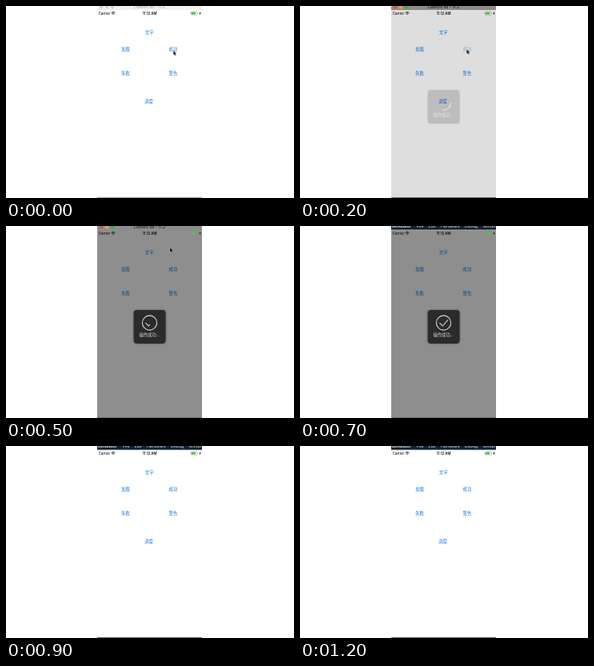
Write an HTML page that moves like this. It is 360x240 px and loops after 1.3 s.

```html
<!DOCTYPE html>
<html lang="zh">
<head>
<meta charset="utf-8">
<title>操作成功</title>
<style>
html, body { margin: 0; width: 100%; height: 100%; overflow: hidden; background: #fff; }
svg { display: block; width: 360px; height: 240px; }
text { font-family: Inter, "Noto Sans CJK SC", "Noto Sans CJK", sans-serif; }
.mid { text-anchor: middle; }
.links { font-size: 5.4px; font-weight: 500; fill: #087be8; }
.status { font-size: 4.3px; fill: #111; }
.title { font-size: 5px; text-anchor: middle; }
.line { fill: none; stroke: #f4f4f4; stroke-width: 1.1; }

/* One loop has 13 steps of 100 ms: each step is 7.69 %. */
.a { animation: 1300ms step-end infinite; }
.idle { animation-name: idle; }
.active { animation-name: active; }
.menu { animation-name: menu; }
.press { animation-name: press; }
.dim { animation-name: dim; }
.box { animation-name: box; filter: drop-shadow(0 0 1.5px rgba(0, 0, 0, .35)); }
.content { animation-name: content; }
.ring { stroke-dasharray: 360 360; transform-origin: 179.5px 121px; animation-name: ring; }
.check { stroke-dasharray: 100 110; animation-name: check; }
.cursor { animation-name: cursor; }

@keyframes idle { 0% { opacity: 1 } 7.69%, 100% { opacity: 0 } }
@keyframes active { 0% { opacity: 0 } 7.69% { opacity: 1 } 46.15%, 100% { opacity: 0 } }
@keyframes menu { 0% { opacity: 0 } 46.15%, 100% { opacity: 1 } }
@keyframes press { 0% { opacity: 1 } 7.69% { opacity: .25 } 15.38% { opacity: .45 } 23.07%, 100% { opacity: 1 } }
@keyframes dim {
  0% { opacity: 0 } 15.38% { opacity: .13 } 23.07% { opacity: .445 }
  61.53% { opacity: .145 } 69.23%, 100% { opacity: 0 }
}
@keyframes box {
  0% { opacity: 0 } 15.38% { opacity: .18 } 23.07% { opacity: .97 }
  61.53% { opacity: .23 } 69.23%, 100% { opacity: 0 }
}
@keyframes content {
  0% { opacity: 0 } 15.38% { opacity: .7 } 23.07% { opacity: .85 }
  61.53% { opacity: .7 } 69.23%, 100% { opacity: 0 }
}
@keyframes ring {
  0% { stroke-dashoffset: 360; transform: rotate(0deg) }
  15.38% { stroke-dashoffset: 262; transform: rotate(0deg) }
  23.07% { stroke-dashoffset: 120; transform: rotate(-20deg) }
  30.76%, 100% { stroke-dashoffset: 0; transform: rotate(0deg) }
}
@keyframes check {
  0% { stroke-dashoffset: 105 } 38.46% { stroke-dashoffset: 50 }
  46.15%, 100% { stroke-dashoffset: 0 }
}
@keyframes cursor {
  0% { transform: translate(209.3px, 55.8px) } 7.69% { transform: translate(208.4px, 54.3px) }
  38.46% { transform: translate(205px, 27px) } 46.15%, 100% { transform: translate(200px, -20px) }
}
</style>
</head>
<body>
<svg viewBox="0 0 360 240">
  <clipPath id="phone"><rect x="114" width="131" height="240"/></clipPath>
  <g clip-path="url(#phone)">
    <g class="links mid">
      <text x="179.2" y="35.1">文字</text>
      <text x="149.6" y="56.1">加载</text>
      <text x="209" y="56.1" class="a press">成功</text>
      <text x="149.6" y="86.1">失败</text>
      <text x="209" y="86.1">警告</text>
      <text x="178.6" y="120.9">进度</text>
    </g>

    <g class="status">
      <text x="115.8" y="10.6" font-weight="500">Carrier</text>
      <g fill="none" stroke="#111" stroke-width=".8">
        <path d="M131.6 8.4 Q134 6.4 136.4 8.4"/>
        <path d="M132.5 9.5 Q134 8.3 135.5 9.5"/>
      </g>
      <circle cx="134" cy="10.5" r=".6"/>
      <text x="179.6" y="10.6" class="mid" font-weight="600">11:12 AM</text>
    </g>

    <rect class="a dim" x="114" y="5" width="131" height="234"/>

    <rect x="231.2" y="7.2" width="8.2" height="3.8" rx="1" fill="none" stroke="#888" stroke-width=".5"/>
    <rect x="231.7" y="7.7" width="5.4" height="2.8" rx=".5" fill="#3fcb55"/>
    <path d="M243 7 L241.3 9.4 H242.4 L242 11.2 L243.8 8.7 H242.7 Z" fill="#111"/>

    <rect class="a box" x="159.6" y="105" width="40" height="42" rx="4" fill="#282828"/>
    <g class="a content">
      <circle class="a line ring" cx="179.5" cy="121" r="9.1" pathLength="360"/>
      <path class="a line check" d="M174.4 121.2 L178.2 125 L184.9 117.3" pathLength="100"/>
      <text class="mid" x="179.4" y="138.1" font-size="5.3" fill="#fff">操作成功...</text>
    </g>
    <rect x="114" y="239" width="131" height="1" fill="#666"/>

    <g class="a idle">
      <rect x="114" y="239" width="131" height="1" fill="#999"/>
      <rect x="114" width="131" height="5" fill="#f1f1f1"/>
      <g fill="#d2d2d2"><circle cx="119" cy="1.5" r="2"/><circle cx="126" cy="1.5" r="2"/><circle cx="133" cy="1.5" r="2"/></g>
      <text class="title" x="179.5" y="3.1" fill="#999">Lumoro 8s - 11.2</text>
    </g>
    <g class="a active">
      <rect x="114" width="131" height="5" fill="#8c8c8c"/>
      <circle cx="119" cy="1.5" r="2.1" fill="#f2463e"/>
      <circle cx="126" cy="1.5" r="2.1" fill="#efa92f"/>
      <circle cx="133" cy="1.5" r="2.1" fill="#2fb436"/>
      <text class="title" x="179.5" y="3.1" font-weight="500" fill="#1c1c1c">Lumoro 8s - 11.2</text>
    </g>
    <g class="a menu">
      <rect x="114" width="131" height="5.3" fill="#c9bdc9"/>
      <rect x="114" width="131" height="4.6" fill="#10232e"/>
      <g font-size="5.2" fill="#e8eef2">
        <text x="114.5" y="1.8" font-weight="700">Simulator</text>
        <text x="146" y="1.8">File</text>
        <text x="160.5" y="1.8">Edit</text>
        <text x="176" y="1.8">Hardware</text>
        <text x="206" y="1.8">Debug</text>
        <text x="228.5" y="1.8">Window</text>
      </g>
    </g>

    <path class="a cursor" d="M0 0 V5.4 L1.2 4.3 L2 6.2 L3 5.8 L2.2 3.9 H3.8 Z"
      fill="#111" stroke="#fff" stroke-width=".5" paint-order="stroke"/>
  </g>
</svg>
</body>
</html>
```
